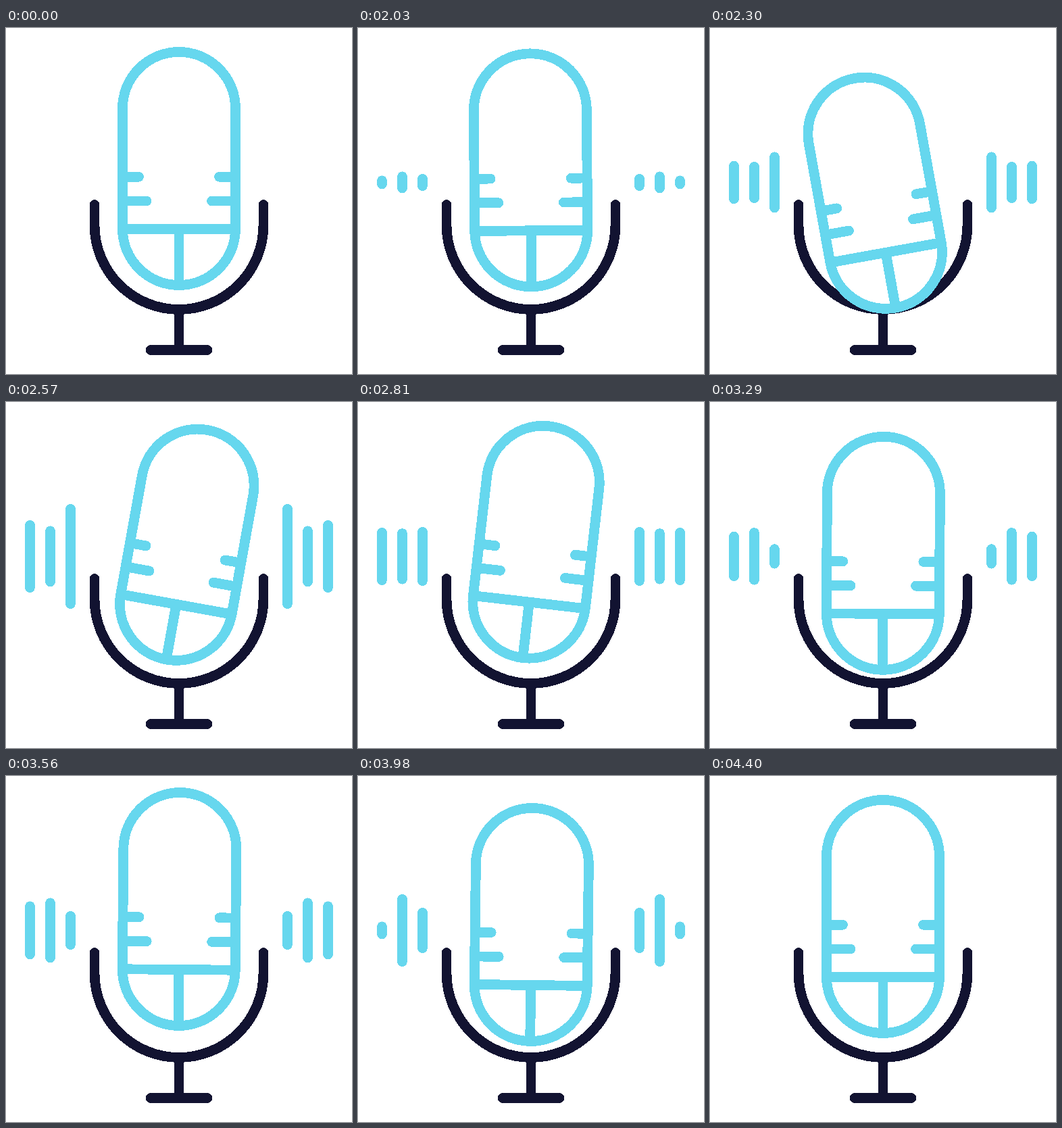
These frames come from a looping animation (512x512 px, 4.43 s). An HTML page:

```html
<!DOCTYPE html>
<html lang="en">
<head>
<meta charset="utf-8">
<title>Microphone</title>
<style>
  html, body { margin: 0; width: 100%; height: 100%; overflow: hidden; background: #fff; }
  svg { display: block; width: 100%; height: 100%; shape-rendering: crispEdges; }
  path { fill: none; stroke-width: 14.8; stroke-linecap: round; }
  .stand { stroke: #121331; }
  .cyan { stroke: #66d7ee; }
  .flat { stroke-linecap: butt; }
</style>
</head>
<body>
<svg viewBox="0 0 512 512">
  <g class="stand">
    <path d="M131 261.5V291.5A125 125 0 0 0 381 291.5V261.5"/>
    <path class="flat" d="M256 416.5V476.5"/>
    <path d="M214 476.5H298"/>
  </g>
  <g id="mic" class="cyan">
    <path d="M172.5 119A83.5 83.5 0 0 1 339.5 119V297A83.5 83.5 0 0 1 172.5 297Z"/>
    <path class="flat" d="M172.5 297.5H339.5M256 297.5V380.5"/>
    <path d="M172.5 220.3H196.5M339.5 220.3H315.5M172.5 256H208M339.5 256H304.5"/>
  </g>
  <path id="bars" class="cyan"/>
</svg>
<script>
const LOOP = 4430, START = 2030, END = 4400, STEP = 30;
const MID_Y = 228.4, CAP = 14.8, PIVOT = '256 274.5';

// Turning points of each motion: time in ms, value.
const drop = [[1970, 0], [2335, 36], [2700, -11], [3065, 36], [3560, -11], [3970, 12], [4290, 0]];
const tilt = [[1990, 0], [2300, -10.2], [2570, 10.2], [3150, 0.3], [3980, 0.7], [4300, 0]];

// Bar heights, outermost first, at each beat of the sound.
const beats = [
  [2030, [20, 32, 25]],
  [2570, [107, 90, 155]],
  [3050, [63, 75, 19]],
  [3560, [86, 96, 57]],
  [3980, [26, 107, 67]],
  [4370, [CAP, CAP, CAP]]
];
const bars = [0, 1, 2].map(i => beats.map(([t, heights]) => [t, heights[i]]));

// Sine ease in and out between neighbouring keys.
function valueAt(keys, t) {
  const i = keys.findIndex(([time]) => time > t);
  if (i < 0) return keys[keys.length - 1][1];
  if (i === 0) return keys[0][1];
  const [ta, a] = keys[i - 1], [tb, b] = keys[i];
  return a + (b - a) * (1 - Math.cos(Math.PI * (t - ta) / (tb - ta))) / 2;
}

function barPair(keys, i, t) {
  const x = 35.5 + 30 * i;
  const half = Math.max(0.05, (valueAt(keys, t) - CAP) / 2);
  return [x, 512 - x].map(px => `M${px} ${MID_Y - half}V${MID_Y + half}`).join('');
}

const mic = document.getElementById('mic');
const sound = document.getElementById('bars');

function draw(time) {
  const t = START + Math.floor((time - START) / STEP) * STEP;
  const active = t >= START && t < END;
  const y = active ? valueAt(drop, t) : 0;
  const angle = active ? valueAt(tilt, t) : 0;
  mic.setAttribute('transform', `translate(0 ${y}) rotate(${angle} ${PIVOT})`);
  sound.setAttribute('d', active ? bars.map((keys, i) => barPair(keys, i, t)).join('') : '');
}

const origin = performance.now();
function tick() {
  draw((performance.now() - origin) % LOOP);
  requestAnimationFrame(tick);
}
tick();
</script>
</body>
</html>
```
